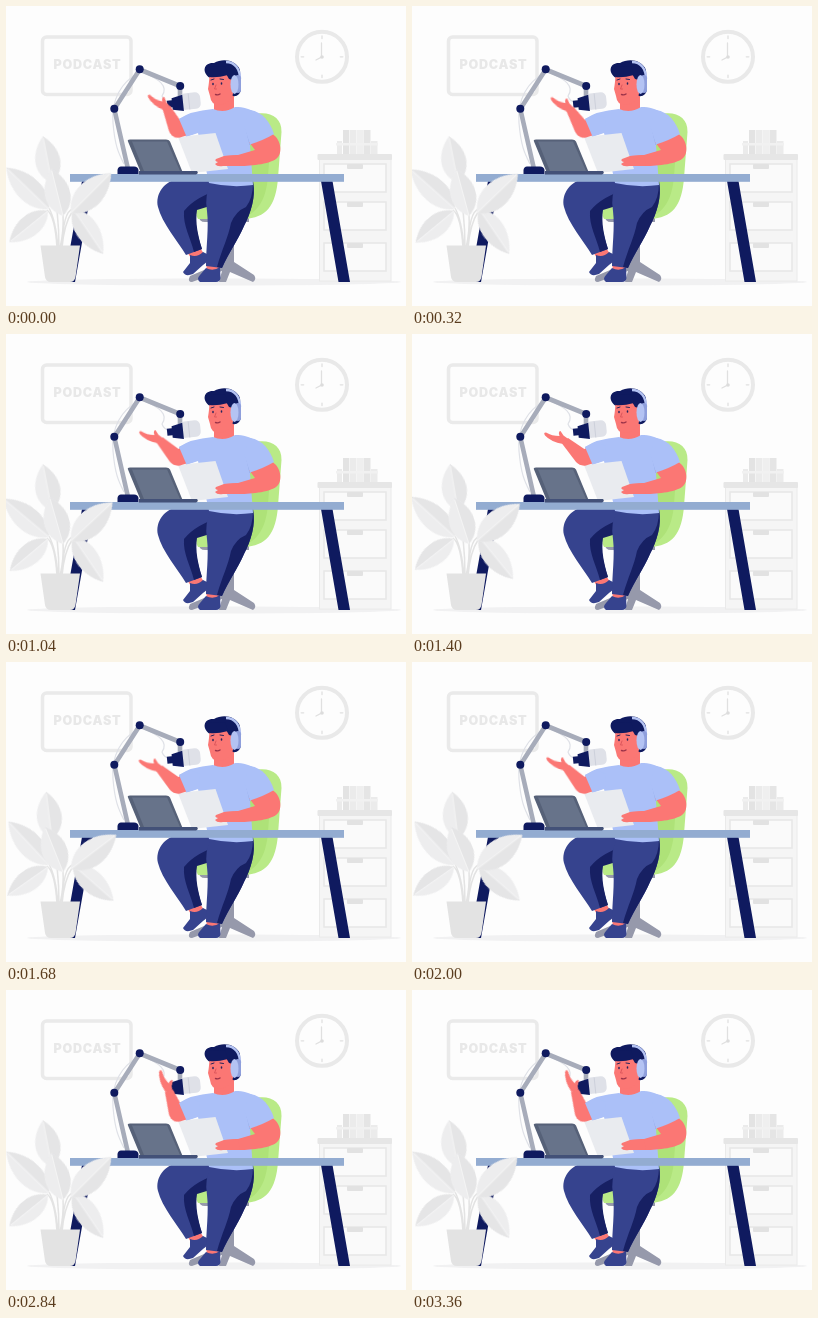
These frames come from a looping animation (400x300 px, 3.4 s). An HTML page without scripts:

```html
<!DOCTYPE html>
<html lang="en">
<head>
<meta charset="utf-8">
<title>Podcast desk</title>
<style>
html, body { margin: 0; width: 100%; height: 100%; overflow: hidden; background: #fdfdfd; }
svg { display: block; width: 100vw; height: 100vh; }
.poster { font: 900 12.6px Inter, "Open Sans", sans-serif; letter-spacing: .75px; }
.skin { fill: #fb7774; }
.navy { fill: #0f1a5f; }
.cloth { fill: #36438e; }
.shade { fill: #172063; }
.shirt { fill: #abc0f8; }
.arm, .hand { animation: 3400ms linear infinite; }
.arm { animation-name: arm; transform-origin: 171px 124px; }
.hand { animation-name: hand; transform-origin: 153px 107px; }

/* each leaf swings to --a, then --b, then back, resting between swings */
.sway { animation: sway 3400ms ease-in-out infinite; }
.back { --a: 0deg; --b: 4deg; transform-origin: 46px 177px; }
.mid { --a: -2deg; --b: -8deg; transform-origin: 57px 210px; }
.left { --a: -4deg; --b: 3deg; transform-origin: 43px 203px; }
.right { --a: 2deg; --b: 8deg; transform-origin: 65px 207px; }
.low-l { --a: -1deg; --b: 4deg; transform-origin: 42px 205px; }
.low-r { --a: 0deg; --b: -15deg; transform-origin: 67px 203px; }

@keyframes sway {
  0%, 83.5%, 100% { transform: rotate(0deg); }
  17.6%, 34.5% { transform: rotate(var(--a)); }
  51%, 67.5% { transform: rotate(var(--b)); }
}
@keyframes arm {
  0% { transform: rotate(21deg); }
  17.6% { transform: rotate(9deg); animation-timing-function: ease-out; }
  41.2% { transform: rotate(0deg); animation-timing-function: ease-in; }
  58.8% { transform: rotate(4deg); }
  71.8% { transform: rotate(20deg); animation-timing-function: ease-out; }
  83.5%, 100% { transform: rotate(27deg); }
}
@keyframes hand {
  0% { transform: rotate(-7deg); }
  17.6% { transform: rotate(-2deg); animation-timing-function: ease-out; }
  41.2% { transform: rotate(0deg); animation-timing-function: ease-in; }
  58.8% { transform: rotate(2deg); }
  71.8% { transform: rotate(5deg); animation-timing-function: ease-out; }
  83.5%, 100% { transform: rotate(20deg); }
}
</style>
</head>
<body>
<svg viewBox="0 0 400 300">
  <defs>
    <g id="leaf">
      <path d="M0 0C-14-11-16-35 0-54C16-35 14-11 0 0Z" fill="#ededee"/>
      <path d="M0 0C14-11 16-35 0-54Z" fill="#e5e5e6"/>
      <path d="M0 0V-52" stroke="#f7f7f7" stroke-width=".8"/>
    </g>
    <g id="drawer">
      <rect x="318" y="0" width="62" height="28" fill="#fafafa" stroke="#e8e8e8" stroke-width="1.6"/>
      <rect x="341" y="0" width="16" height="5" rx="1" fill="#e2e2e2"/>
    </g>
    <path id="tick" d="M316 30V32.500"/>
  </defs>

  <rect width="400" height="300" fill="#fdfdfd"/>

  <!-- wall -->
  <rect x="36.500" y="31" width="88.500" height="57.500" rx="4" fill="none" stroke="#eaeaea" stroke-width="3.500"/>
  <text class="poster" x="81.400" y="63.200" text-anchor="middle" fill="#e8e8e8">PODCAST</text>
  <circle cx="316" cy="50.800" r="25" fill="#fdfdfd" stroke="#e9e9e9" stroke-width="4"/>
  <g stroke="#e0e0e0" stroke-width="1.300" stroke-linecap="round" fill="none">
    <use href="#tick"/>
    <use href="#tick" transform="rotate(90 316 50.800)"/>
    <use href="#tick" transform="rotate(180 316 50.800)"/>
    <use href="#tick" transform="rotate(270 316 50.800)"/>
    <path d="M315.500 37V51L310 54"/>
  </g>
  <circle cx="316" cy="51" r="1.800" fill="#dcdcdc"/>

  <!-- floor and cabinet -->
  <ellipse cx="208" cy="276" rx="187" ry="3.500" fill="#f1f1f2"/>
  <g fill="#ebebeb">
    <rect x="331" y="135" width="5" height="13"/>
    <rect x="337" y="124" width="6" height="24" fill="#e3e3e3"/>
    <rect x="343.500" y="124" width="7" height="24"/>
    <rect x="351" y="124" width="6" height="24" fill="#efefef"/>
    <rect x="357.500" y="124" width="7" height="24" fill="#e5e5e5"/>
    <rect x="365" y="135" width="6.500" height="13"/>
    <rect x="330" y="137" width="42" height="2.500" fill="#f1f1f1"/>
  </g>
  <rect x="313.500" y="151" width="71.500" height="124" fill="#f5f5f5" stroke="#eaeaea"/>
  <rect x="311.500" y="148" width="74.500" height="6" rx="1" fill="#e6e6e6"/>
  <use href="#drawer" y="158"/>
  <use href="#drawer" y="196"/>
  <use href="#drawer" y="237"/>

  <!-- chair -->
  <g fill="#9699ab">
    <rect x="219" y="211" width="9" height="49"/>
    <path d="M217 256H228L248 269Q251 273 247 276L224 266L220 276H213L216 265L186 276Q181 276 184 270Z"/>
    <path d="M193 210H243V216H199Q193 216 193 210Z"/>
  </g>
  <path d="M245 109C262 104 276 110 275.500 126L272 172C270 200 260 212 238 213H192Q188 206 192 200H232V165Z" fill="#b9ea87"/>
  <path d="M246 109Q262 110 265 130L262 170C260 196 250 209 232 213L230 165Z" fill="#aee278"/>

  <!-- legs -->
  <path class="skin" d="M180 244L193 240L198 248L186 254ZM200 256H215L213 266H201Z"/>
  <path class="cloth" d="M184 249Q191 252 197 246L203 249Q204 254 197 259L187 268Q179 271 177 266L184 257ZM200 262Q207 266 214 261L214.500 272Q214 276 210 276H194Q190 273 194 269Z"/>
  <path class="cloth" d="M205 172H174C158 175 149 188 152 201C156 217 171 234 180 249L196 243C191 228 188 214 190 203L217 193Z"/>
  <path class="shade" d="M196 243L188 246C184 230 177 220 178 205Q190 190 216 183L217 196L191 204C189 216 192 230 196 243Z"/>
  <path class="cloth" d="M206 174H247C250 190 245 207 238 220C232 234 222 248 216 262L200 260C200 240 203 222 201 205Q198 190 206 174Z"/>
  <path class="shade" d="M247 177C250 190 245 207 238 220C232 234 222 248 216 262L211 261C216 243 222 232 225 217Q230 205 240 201Q247 192 247 177Z"/>

  <!-- torso -->
  <path class="skin" d="M208 86H228V102Q229 109 219 109Q207 109 208 101Z"/>
  <path class="shirt" d="M207 103Q218 108 229 101C246 101 256 108 261 126L244 139L247 179Q225 182 203 177L192 127L180 131L173 113Q184 105 207 103Z"/>
  <path d="M240 122L244 139" stroke="#93abe8" fill="none"/>
  <path class="skin" d="M263 127C274 129 277 145 272 151C267 158 245 160 234 160L217 160Q211 161 209 158L212 156Q208 155 210 153L218 150L232 149L249 144L243 136Z"/>
  <path class="shirt" d="M244 104C257 106 264 116 268 128Q258 134 244 138.500L238 120Z"/>

  <!-- head -->
  <path class="navy" d="M204 72C195 66 198 56 208 57C217 52 230 54 234 64L235 84Q233 91 227 90L218 78Z"/>
  <path class="skin" d="M203.500 69Q213 72 219 66L223 73L227 74V88Q223 98 213 99Q205 99 204 90L202 83Q203 78 203.500 69Z"/>
  <path class="navy" d="M203.500 71Q199 68 201 61L219 60L222 69Q211 72 203.500 71Z"/>
  <g fill="none" stroke="#26245c" stroke-linecap="round">
    <path d="M205 74L208 73M214 73L217.500 73.500" stroke-width="1"/>
    <path d="M207 77.500V78.500M215.500 77V78" stroke-width="1.500"/>
    <path d="M210 79L208.500 83H210.500" stroke="#d9545a" stroke-width=".9"/>
    <path d="M209.500 88.500Q212 89.500 214 88" stroke="#9c3349" stroke-width="1.400"/>
  </g>
  <path d="M220 56C229 56 234 63 234 73" fill="none" stroke="#b4c3f3" stroke-width="2.400"/>
  <rect x="229" y="69" width="6" height="18" rx="3" fill="#8f9fdc"/>
  <ellipse cx="228.500" cy="78.500" rx="4" ry="9.500" fill="#b4c3f3"/>

  <!-- desk -->
  <path class="navy" d="M76 175H87L69 276H58ZM315 175H326.500L344 276H332.500Z"/>
  <rect x="64" y="168" width="274" height="7.800" fill="#93acd1"/>

  <!-- paper -->
  <path d="M172 131L209.500 127L222 163L186 167Z" fill="#e9ebef"/>
  <path class="skin" d="M232 149L218 150L210 153Q208 155 212 156L209 158Q211 161 217 160L234 160Z"/>

  <!-- laptop -->
  <path d="M122 135.500Q121 133.500 124 133.500H160Q163 133.500 164 135.500L177 167H135Z" fill="#566178"/>
  <path d="M126 135.500H161L174 165H138Z" fill="#67738a"/>
  <path d="M133 165H191Q193 167 190 168.500H133Z" fill="#435178"/>

  <!-- microphone -->
  <path d="M131 68C116 76 105 93 107 117S113 148 118 158M136 66C153 73 163 80 156 90Q158 96 164 96" fill="none" stroke="#dfe1e7" stroke-width="1.200"/>
  <path d="M122 163L108.300 103L133.700 63.500L174 80V90" fill="none" stroke="#a7acba" stroke-width="4.600" stroke-linejoin="round"/>
  <path class="navy" d="M111.500 168V164Q112 160.500 115 160.500H128Q132 160.500 132.500 164V168Z"/>
  <circle class="navy" cx="108.300" cy="102.800" r="4"/>
  <circle class="navy" cx="133.700" cy="63.300" r="4"/>
  <circle class="navy" cx="174.200" cy="80" r="4"/>
  <g transform="rotate(-6 178 96)">
    <rect x="174" y="87.500" width="20.500" height="16.500" rx="5" fill="#dfe1e8"/>
    <path d="M183 88V104" stroke="#cdd0da"/>
    <path class="navy" d="M161 93H166V91L177 88.500V105L166 102.500V100H161Z"/>
  </g>

  <!-- waving arm -->
  <path class="skin" d="M167 118L178 112L185 128L174 131.500Q166 132 164 125Z"/>
  <g class="arm">
    <path class="skin" d="M150 109.500L156 104L176 117.500Q180 129 173 131.500Q168 132 164 128Z"/>
    <g class="hand">
      <path class="skin" d="M157 105.500L151.500 101.500L148.500 97Q146.500 97 147 100L147.500 102Q140 102 134 98.500Q131 98.500 133 101.500Q139 108 151 110Z"/>
    </g>
  </g>
  <path class="shirt" d="M184 108L173 113L180.500 130.500L193 126L194 112Z"/>

  <!-- plant -->
  <g fill="none" stroke="#e3e3e3" stroke-width="1.500">
    <path d="M53 242Q53 205 46 176M54 242Q58 225 57 207M52 242Q50 215 43 202M56 242Q58 218 66 206M51 242Q49 210 41 204M56 242Q57 205 67 203"/>
  </g>
  <g class="sway back"><use href="#leaf" transform="translate(46 177) rotate(-11) scale(1.100 .88)"/></g>
  <g class="sway left"><use href="#leaf" transform="translate(43 203) rotate(-46) scale(1.080 1.100)"/></g>
  <g class="sway low-l"><use href="#leaf" transform="translate(42 205) rotate(-129) scale(.95 .92)"/></g>
  <g class="sway low-r"><use href="#leaf" transform="translate(67 203) rotate(146) scale(1 1)"/></g>
  <g class="sway right"><use href="#leaf" transform="translate(65 207) rotate(45) scale(1.150 1.050)"/></g>
  <g class="sway mid"><use href="#leaf" transform="translate(57 210) rotate(-14) scale(1.120 .9)"/></g>
  <path d="M34.500 239.500H74L69.500 271Q68.500 276 64 276H45Q40 276 39 271Z" fill="#e3e3e3"/>
</svg>
</body>
</html>
```
